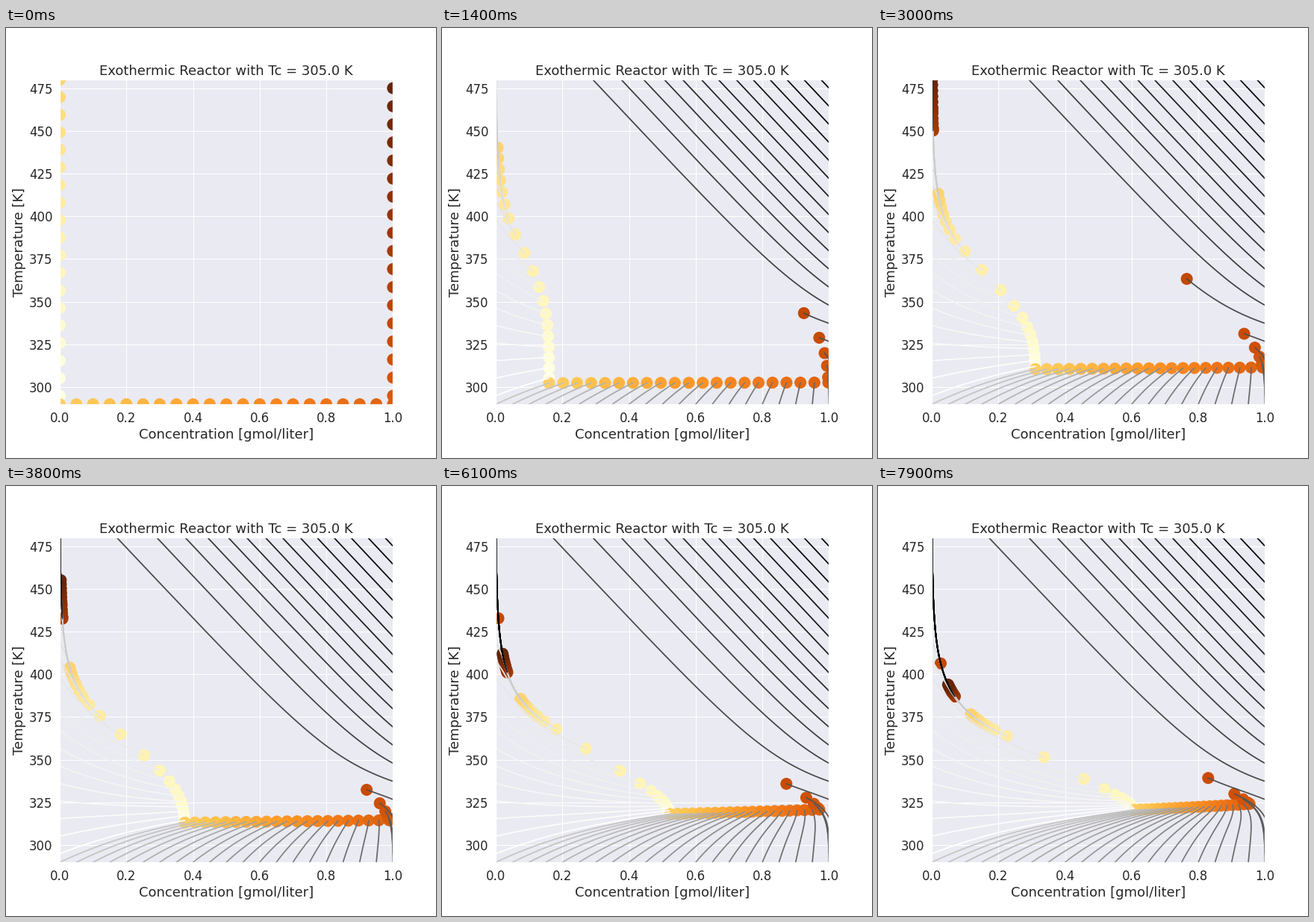
Recreate the animation shown at these times as a matplotlib script. Size 576 by 576 pixels, loop 8000 ms.

```python
import numpy as np
import matplotlib.pyplot as plt
from matplotlib.animation import FuncAnimation
from matplotlib.collections import LineCollection

FRAMES, INTERVAL = 80, 100
DT = 0.0125          # process minutes per frame
SUB, KEEP = 100, 20  # solver steps per frame, steps per stored point

# Stirred tank reactor with a cooling jacket
TC, T_FEED, C_FEED = 305.0, 350.0, 1.0
K0, EA_R = 7.2e10, 72750 / 8.314
FLOW = 1.0                    # q / V
HEAT = 5.0e4 / (1000 * 0.239)  # temperature rise per unit reacted
COOL = 5.0e4 / (100 * 1000 * 0.239)


def rate(T):
    return K0 * np.exp(-EA_R / T)


def relax(c, k, h):
    """Exact concentration step at a fixed rate constant."""
    steady = FLOW * C_FEED / (FLOW + k)
    return steady + (c - steady) * np.exp(-(FLOW + k) * h)


def step(c, T, h):
    # T + HEAT * c has no reaction term, so it stays smooth during ignition
    def energy(c_mid, T_mid):
        slope = (FLOW * (T_FEED - T_mid) + COOL * (TC - T_mid)
                 + HEAT * FLOW * (C_FEED - c_mid))
        return T + HEAT * c + h * slope

    c1 = relax(c, rate(T), h)
    T1 = energy((c + c1) / 2, T) - HEAT * c1
    T_mid = (T + T1) / 2
    c2 = relax(c, rate(T_mid), h)
    return c2, energy((c + c2) / 2, T_mid) - HEAT * c2


def simulate(c, T):
    h = DT / SUB
    path = [np.column_stack([c, T])]
    for i in range(1, (FRAMES - 1) * SUB + 1):
        c, T = step(c, T, h)
        if i % KEEP == 0:
            path.append(np.column_stack([c, T]))
    return np.array(path)


# Start points along the left, bottom and right edges
left, bottom, right = (np.linspace(295, 480, 19), np.linspace(0, 1, 21),
                       np.linspace(295, 475, 18))
c0 = np.concatenate([np.zeros_like(left), bottom, np.ones_like(right)])
T0 = np.concatenate([left, np.full_like(bottom, 290), right])
path = simulate(c0, T0)

plt.rcParams.update({"font.family": "DejaVu Sans", "text.color": "0.15",
                     "axes.labelcolor": "0.15"})
fig, ax = plt.subplots(figsize=(8, 8), dpi=72, facecolor="white")
fig.subplots_adjust(left=0.125, right=0.9, bottom=0.125, top=0.88)
ax.set_facecolor("#EAEAF2")
ax.set_axisbelow(True)
ax.grid(color="white", lw=1)
for spine in ax.spines.values():
    spine.set(color="white", linewidth=1.25)
ax.tick_params(length=0, pad=9.5, labelsize=16.5, labelcolor="0.15")
ax.set_title(f"Exothermic Reactor with Tc = {TC} K", fontsize=18, pad=6)
ax.set_xlabel("Concentration [gmol/liter]", fontsize=18, labelpad=4)
ax.set_ylabel("Temperature [K]", fontsize=18, labelpad=4)

shade = np.linspace(0, 1, len(c0))
dots = ax.scatter(c0, T0, s=15 ** 2, c=plt.cm.YlOrBr(shade),
                  edgecolors="face", linewidths=1, zorder=1.5)
trails = LineCollection([], colors=plt.cm.Greys(shade), linewidths=1.75,
                        capstyle="round", joinstyle="round", zorder=2)
ax.add_collection(trails, autolim=False)
ax.set(xlim=(0, 1), ylim=(290, 480))
ax.set_xticks(np.linspace(0, 1, 6))
ax.set_yticks(np.arange(300, 480, 25))


def update(frame):
    n = frame * SUB // KEEP
    dots.set_offsets(path[n])
    trails.set_segments(list(path[:n + 1].swapaxes(0, 1)) if n else [])
    return dots, trails


anim = FuncAnimation(fig, update, frames=FRAMES, interval=INTERVAL,
                     repeat=True, repeat_delay=0)
plt.show()
```
